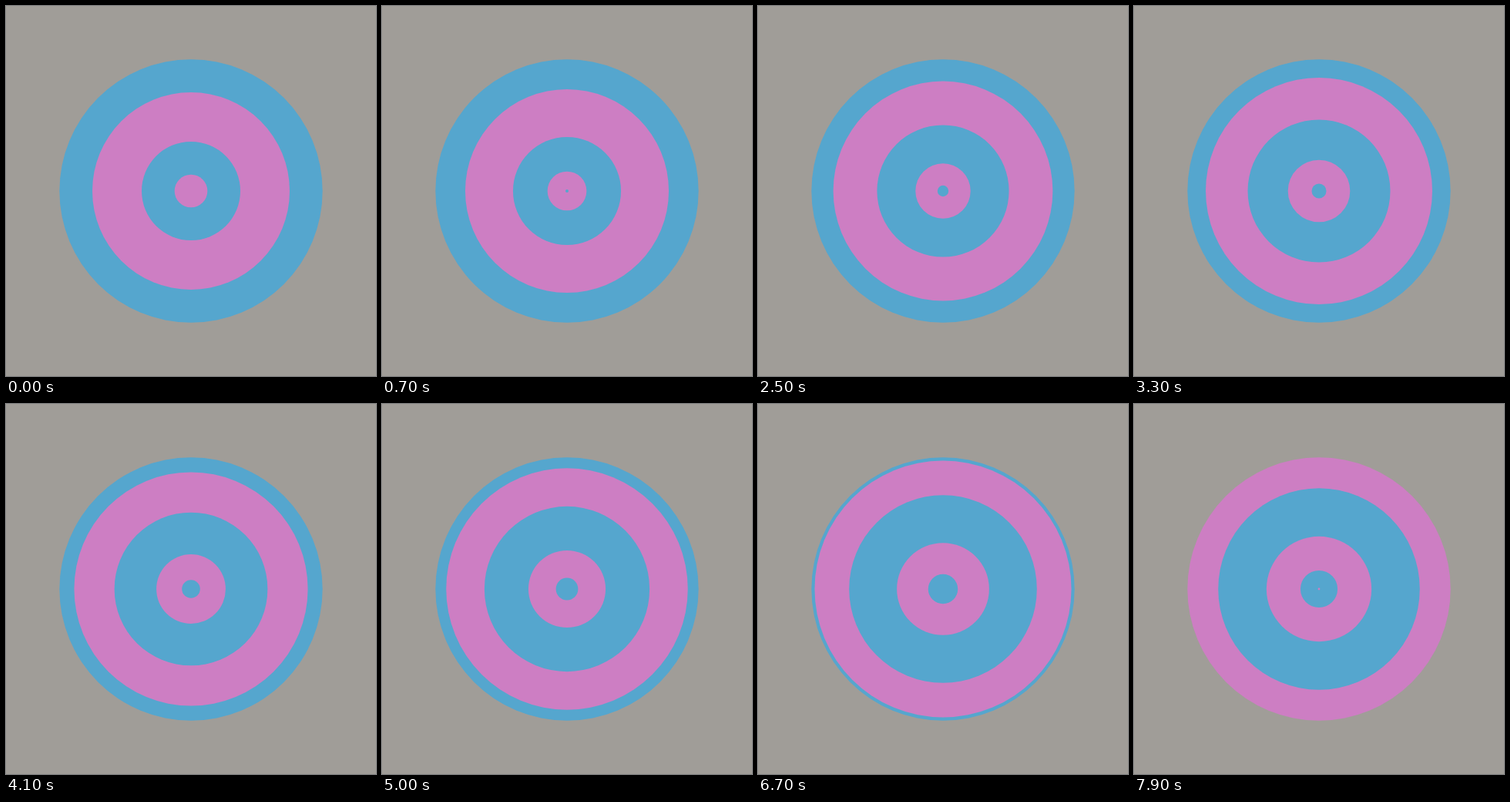
Recreate the animation shown at these times as an HTML page. Size 480 by 480 pixels, loop 8 s.

```html
<!DOCTYPE html>
<html lang="en">
<head>
<meta charset="utf-8">
<title>Growing rings</title>
<style>
  html, body { margin: 0; width: 100%; height: 100%; overflow: hidden; background: #a09d98; }
  svg { display: block; width: 100vw; height: 100vh; }
</style>
</head>
<body>
<svg viewBox="0 0 480 480"></svg>
<script>
const LOOP = 8000, STEP = 100, CYCLE = 7420;
const COLORS = ['#55a6ce', '#cd7ec3'];
const UNIT = 64 / 3;
// Each ring grows from one stop to the next during a cycle.
const STOPS = [0, 1, 3, 6, 8].map(n => n * UNIT);

const svg = document.querySelector('svg');
function addCircle(r) {
  const c = document.createElementNS('http://www.w3.org/2000/svg', 'circle');
  c.setAttribute('cx', 240);
  c.setAttribute('cy', 240);
  c.setAttribute('r', r);
  svg.append(c);
  return c;
}

const disc = addCircle(STOPS[4]);
const rings = [3, 2, 1, 0].map(level => ({ level, el: addCircle(0) }));

function draw(time) {
  const t = Math.floor((time % LOOP) / STEP) * STEP;
  const cycle = Math.floor(t / CYCLE);
  const phase = t / CYCLE - cycle;
  disc.setAttribute('fill', COLORS[cycle % 2]);
  for (const { level, el } of rings) {
    const from = STOPS[level], to = STOPS[level + 1];
    el.setAttribute('r', from + (to - from) * phase);
    el.setAttribute('fill', COLORS[(cycle + level) % 2]);
  }
}

const start = performance.now();
function tick() {
  draw(performance.now() - start);
  requestAnimationFrame(tick);
}
tick();
</script>
</body>
</html>
```
